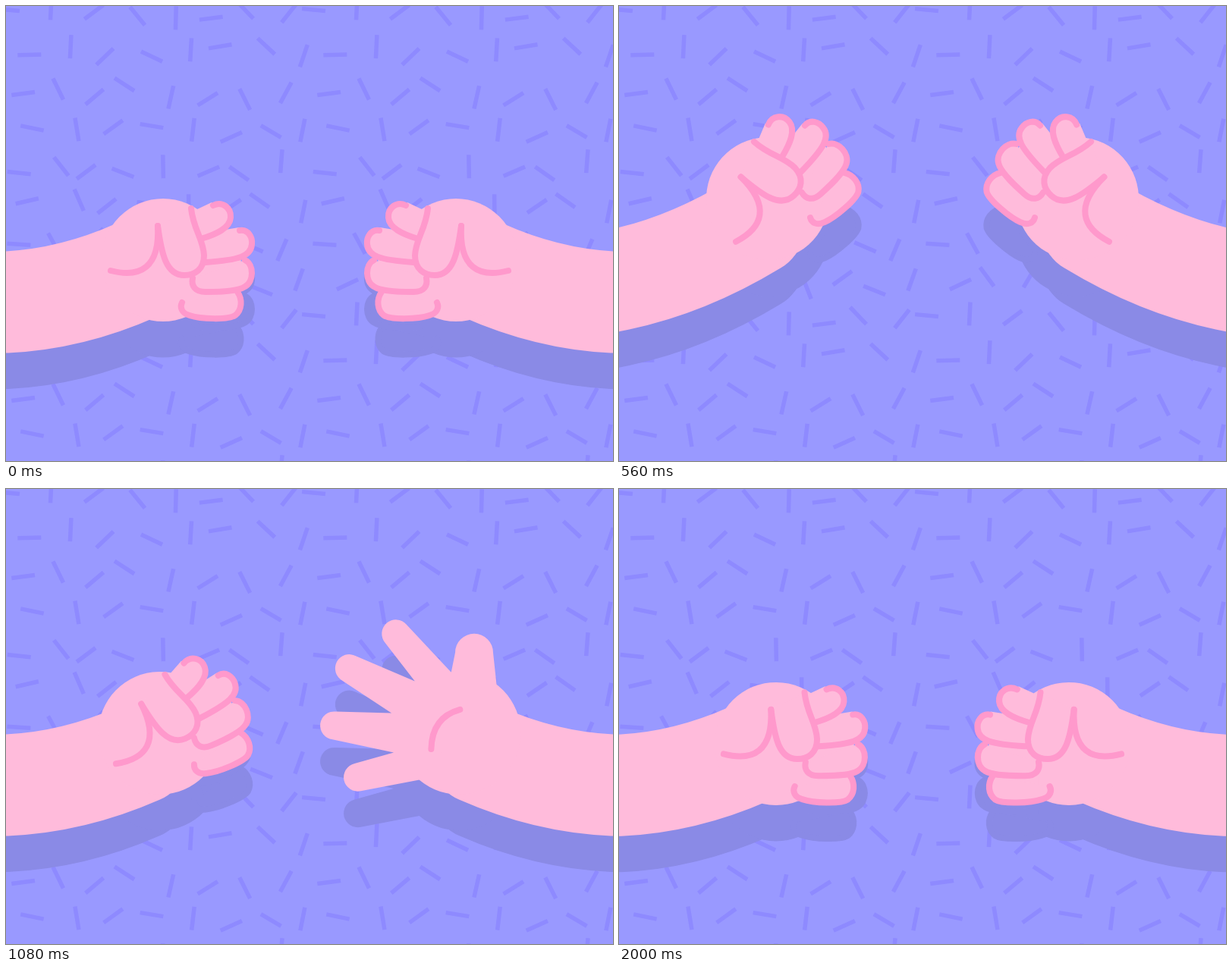
Write an HTML page with a canvas that moves like this. It is 800 by 600 pixels and loops after 2040 ms.

```html
<!DOCTYPE html>
<html lang="en">
<head>
<meta charset="utf-8">
<title>Fists</title>
<style>
  html, body { margin: 0; width: 100%; height: 100%; overflow: hidden; background: #9999ff; }
  canvas { display: block; }
</style>
</head>
<body>
<canvas id="stage" width="800" height="600"></canvas>
<script>
const ctx = document.getElementById('stage').getContext('2d');
const LOOP = 2040, STEP = 40;
const BACK = '#9999ff', DASH = '#8e8aff', SHADE = '#8a8ae6', SKIN = '#ffbbdb', LINE = '#ff99cc';
const TILE = 403, CELLS = 8, DASH_LENGTH = 31;
const PALM = 81, ARM = 134, DROP = 47.5, REST = 348.5;
const rad = deg => deg * Math.PI / 180;
const polar = (deg, r) => [r * Math.cos(rad(deg)), r * Math.sin(rad(deg))];

// Easing
const ramp = (t, from, to) => Math.min(1, Math.max(0, (t - from) / (to - from)));
const smooth = u => u * u * (3 - 2 * u);
const fall = u => u * u;
const lateFall = u => u ** 4;
const settle = u => Math.sin(u * Math.PI / 2);

// Wrist height and hand turn, with the easing that leads to each
const keys = [
  { t: 0, y: REST, turn: 0 },
  { t: 120, y: 354, turn: 2 },
  { t: 560, y: 288, turn: -42 },
  { t: 880, y: 366, turn: 1, easeY: fall, easeTurn: lateFall },
  { t: 1080, y: REST, turn: -23.5, easeTurn: settle },
  { t: 1760, y: 348, turn: -24 },
  { t: 1920, y: 351, turn: 1.5 },
  { t: LOOP, y: REST, turn: 0 }
];

function poseAt(t) {
  const i = keys.findIndex(k => t < k.t);
  const a = keys[i - 1], b = keys[i], u = ramp(t, a.t, b.t);
  const turn = a.turn + (b.turn - a.turn) * (b.easeTurn || smooth)(u);
  return {
    x: 171.5 - 0.17 * turn,
    y: a.y + (b.y - a.y) * (b.easeY || smooth)(u),
    turn
  };
}

const openAt = t => smooth(ramp(t, 760, 880)) - smooth(ramp(t, 1760, LOOP));

// Background: dashes scattered over a staggered grid that repeats
function randomFrom(seed) {
  return () => (seed = seed * 16807 % 2147483647) / 2147483647;
}

function scatter() {
  const random = randomFrom(77), cell = TILE / CELLS, path = new Path2D();
  for (let n = 0; n < CELLS * CELLS; n++) {
    const row = Math.floor(n / CELLS);
    const x = (n % CELLS + row % 2 / 2 + 0.25 + (random() - 0.5) * 0.4) * cell;
    const y = (row + 0.25 + (random() - 0.5) * 0.4) * cell;
    const [dx, dy] = polar(n * 67 + random() * 30, DASH_LENGTH / 2);
    for (let ox = -TILE; ox < 800; ox += TILE)
      for (let oy = -TILE; oy < 600; oy += TILE) {
        path.moveTo(ox + x - dx, oy + y - dy);
        path.lineTo(ox + x + dx, oy + y + dy);
      }
  }
  return path;
}
const dashes = scatter();

function drawBack() {
  ctx.fillStyle = BACK;
  ctx.fillRect(0, 0, 800, 600);
  ctx.lineWidth = 5.5;
  ctx.strokeStyle = DASH;
  ctx.stroke(dashes);
}

// Closed fist around the palm centre: outline, then the points that close the fill
const part = (line, back = '') => ({ line: new Path2D(line), fill: new Path2D(line + back + 'Z') });
const knuckles = new Path2D('M40 -50L70 -40L100 -20L105 20L92 60L40 60Z');
const fist = [
  part('M98 42C105 52 104 66 95 73C86 79 50 78 35 73C24 70 22 62 25 56'),
  part('M108 0C120 6 120 28 108 35C98 42 70 42 56 42C42 42 37 34 39 24'),
  part('M101 -39C112 -41 118 -30 117 -21C116 -5 100 0 56 3', 'L40 -20L82 -40L100 -43'),
  part('M66 -72C78 -78 90 -69 89 -56C88 -42 70 -34 50 -28', 'L30 -40L45 -67L64 -76')
];
const thumb = part('M37 -68C40 -40 53 -28 54 -6C54 12 42 20 28 20C4 20 -2 -8 -7 -45');
const thumbFold = new Path2D('M-7 -45C-4 10 -30 24 -69 14');
const palmFold = new Path2D('M11.5 -29Q41.5 -5 25.5 34');

function drawFist(skin, line, open) {
  const draw = p => { ctx.fill(p.fill); ctx.stroke(p.line); };
  ctx.fillStyle = skin;
  ctx.strokeStyle = line;
  ctx.save();
  ctx.scale(1 + open / 2, 1);
  ctx.fill(knuckles);
  fist.forEach(draw);
  ctx.restore();
  draw(thumb);
  ctx.stroke(thumbFold);
}

// Open hand: the thumb is digit 0, the others fan out evenly
const web = k => k ? polar(33 * k - 92, 93 - 3 * (k - 3) ** 2) : polar(-106, 78);
const tip = k => k ? polar(27 * k - 61, 169 - 8 * (k - 2.3) ** 2) : polar(-77, 108);

function drawOpen(skin, line, open) {
  ctx.beginPath();
  ctx.moveTo(...web(0));
  for (let k = 0; k < 5; k++) {
    const [ax, ay] = web(k), [bx, by] = web(k + 1), [x, y] = tip(k);
    const mx = (ax + bx) / 2, my = (ay + by) / 2;
    const dir = Math.atan2(y - my, x - mx);
    ctx.arc(mx + (x - mx) * open, my + (y - my) * open, k ? 18.5 : 25, dir - Math.PI / 2, dir + Math.PI / 2);
    ctx.lineTo(bx, by);
  }
  ctx.closePath();
  ctx.fillStyle = skin;
  ctx.fill();
  ctx.strokeStyle = line;
  ctx.stroke(palmFold);
}

function drawArm({ x, y }, skin) {
  const d = y - REST;
  const edge = 390.5 + 0.34 * d - 0.0025 * d * d;
  const start = (edge - y) / x - 0.2;
  ctx.beginPath();
  ctx.moveTo(-40, edge + 40 * start);
  ctx.lineTo(0, edge);
  ctx.quadraticCurveTo(x / 2, edge - start * x / 2, x, y);
  ctx.lineWidth = ARM;
  ctx.strokeStyle = skin;
  ctx.stroke();
}

function drawHand(pose, mirrored, open, skin, line, drop) {
  ctx.save();
  if (mirrored) { ctx.translate(800, 0); ctx.scale(-1, 1); }
  ctx.translate(0, drop);
  ctx.lineCap = ctx.lineJoin = 'round';
  drawArm(pose, skin);
  ctx.translate(pose.x, pose.y);
  ctx.rotate(rad(pose.turn));
  ctx.translate(35.5, -13.5);
  ctx.beginPath();
  ctx.arc(0, 0, PALM, 0, 7);
  ctx.fillStyle = skin;
  ctx.fill();
  ctx.lineWidth = 8;
  (open > 0.4 ? drawOpen : drawFist)(skin, line, open);
  ctx.restore();
}

function frame() {
  const t = Math.floor(performance.now() % LOOP / STEP) * STEP;
  const pose = poseAt(t), open = openAt(t);
  drawBack();
  for (const [skin, line, drop] of [[SHADE, SHADE, DROP], [SKIN, LINE, 0]]) {
    drawHand(pose, false, 0, skin, line, drop);
    drawHand(pose, true, open, skin, line, drop);
  }
  requestAnimationFrame(frame);
}
frame();
</script>
</body>
</html>
```
